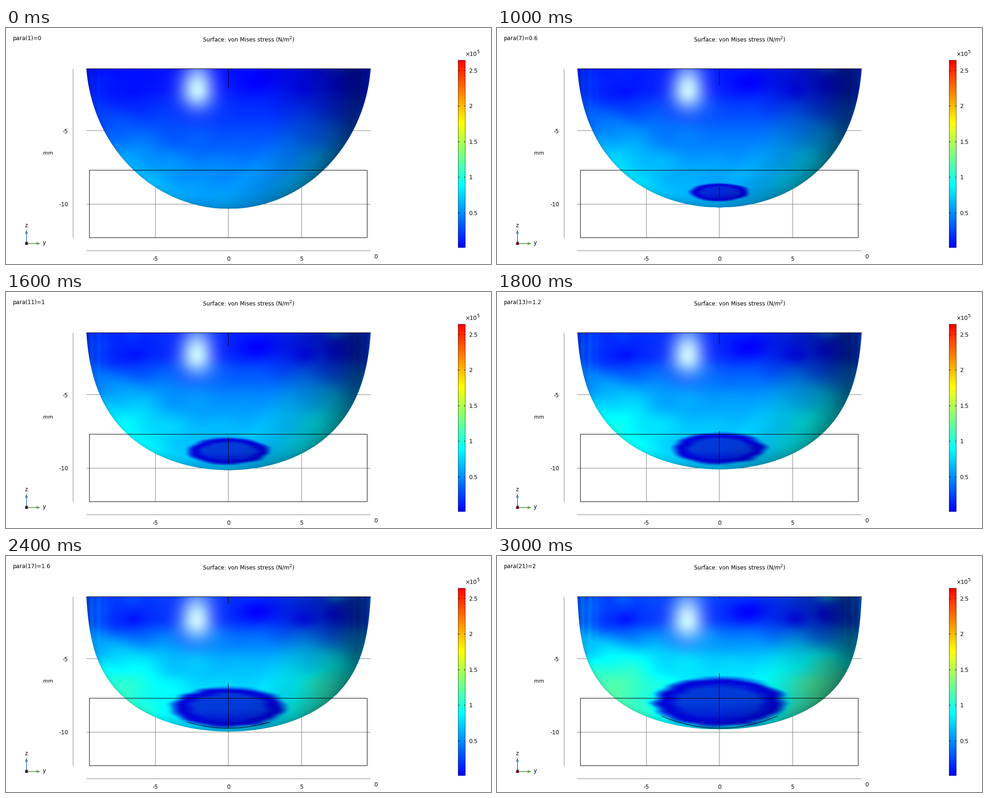
Animation of 1044x507 px, one loop 3200 ms. Source, as a matplotlib script:

```python
import numpy as np
import matplotlib.pyplot as plt
from matplotlib.animation import FuncAnimation
from matplotlib.patches import Circle, Polygon, Rectangle

W, H, DPI = 1044, 507, 64
PX = 72 / DPI
FRAMES, STEPS = 16, 20
CX, TOP, HALF = 479, 87.5, 306
X0, X1, Y0, Y1 = 165, 793, 87, 395

plt.rcParams["font.family"] = "DejaVu Sans"
fig = plt.figure(figsize=(W / DPI, H / DPI), dpi=DPI, facecolor="white")
ax = fig.add_axes([0, 0, 1, 1])
ax.axis("off")


def line(xs, ys, color="black", z=4, width=1):
    return ax.plot(xs, ys, color=color, lw=width * PX, zorder=z, snap=False,
                   solid_capstyle="butt", solid_joinstyle="miter")[0]


def label(x, y, text, size=12, ha="left"):
    return ax.text(x, y, text, fontsize=size * PX, ha=ha, va="baseline", zorder=6)


def rainbow(g):
    """Blue at 0, cyan at 1, yellow at 2, red at 3."""
    knots = [0, 1, 2, 3]
    return np.stack([np.interp(g, knots, [0, 0, 1, 1]),
                     np.interp(g, knots, [0, 1, 1, 0]),
                     np.interp(g, knots, [1, 1, 0, 0])], axis=-1)


def smooth(a, b, v):
    t = np.clip((v - a) / (b - a), 0, 1)
    return t * t * (3 - 2 * t)


# Pixel grid of the bowl and its fixed wispy patterns
gx, gy = np.meshgrid(np.arange(X0, X1) + 0.5, np.arange(Y0, Y1) + 0.5)
dx = gx - CX
rng = np.random.default_rng(4)


def waves(kx, ky, count=10):
    return sum(np.sin(gx * rng.uniform(-kx, kx) + gy * rng.uniform(ky / 4, ky)
                      + rng.uniform(0, 6.3)) for _ in range(count)) / count


wisp = waves(0.07, 0.1)
streak = waves(0.08, 0.4)

# Stress blobs near the rim: x, y, x radius, y radius, strength
BLOBS = [(277, 138, 24, 16, -0.15), (540, 118, 45, 24, -0.18),
         (645, 138, 26, 18, -0.13), (703, 126, 22, 20, -0.15),
         (712, 86, 26, 13, 0.36), (272, 92, 24, 16, 0.13),
         (205, 130, 26, 45, 0.08), (330, 120, 24, 34, 0.05)]
blobs = sum(a * np.exp(-((gx - x) / rx) ** 2 - ((gy - y) / ry) ** 2)
            for x, y, rx, ry, a in BLOBS)
rim_side = smooth(0.78, 1, np.abs(dx) / HALF) * (1 - smooth(150, 210, gy))
blobs += rim_side * (0.16 + 0.06 * np.sin(0.4 * dx))

LEVELS = [87, 140, 180, 220, 270, 330, 388]
REST = [0.03, 0.09, 0.19, 0.33, 0.51, 0.69, 0.74]
PRESSED = [0.23, 0.19, 0.56, 0.92, 1.10, 1.11, 0.95]


def half_width(y, p, bottom):
    t = p / 2
    u = np.clip((y - TOP) / (bottom - TOP), 0, 1)
    q = ((0.15 - 0.05 * t) * u + (0.85 - 0.80 * t) * u**2
         + 0.55 * t * u**3 + 0.30 * t * u**4)
    return HALF * np.sqrt(np.clip(1 - q, 0, 1))


def stress(p, t):
    y = gy + 10 * wisp
    levels = (1 - t) * np.array(REST) + t * np.array(PRESSED)
    base = sum(np.interp(y + d, LEVELS, levels) for d in (-12, -6, 0, 6, 12)) / 5
    side = 0.86 + 0.31 * np.exp(-((np.abs(dx) / HALF - 0.74) / 0.32) ** 2)
    g = base * (1 + (side - 1) * smooth(140, 230, gy))
    g += (0.3 + 0.7 * t) * blobs + (0.03 + 0.04 * t) * wisp
    return np.clip(g, 0, 3)


def bowl(p):
    t = (p / 2) ** 1.1
    bottom = 388.5 - 3.6 * p - 2.2 * p * p
    g = stress(p, t)
    shade = 1.0

    if p > 0:
        hi, lo = 366 - 50 * p, 374 - 6 * p
        rx, ry = 22 + 60 * p - 3.5 * p * p, (lo - hi) / 2
        ey = (gy - (hi + lo) / 2) / ry
        r = np.hypot(dx / rx, ey) + 0.09 * streak
        inner = (0.24 * min(1, p / 0.9) * (1 - smooth(0.62, 0.9, r))
                 * (1 - 0.6 * smooth(0, 0.8, ey)))
        fade = min(1, p / 0.45) * (1 - smooth(0.92, 1.24, r))
        g = g + (inner + 0.03 - g) * fade
        shade = 1 - 0.15 * fade

    # Lambert light from the left, seen on both faces
    w = half_width(gy, p, bottom)
    ny = np.clip((gy - 63) / (bottom - 63), 0, 1)
    ring = np.sqrt(1 - ny**2)
    nx = np.clip(dx / np.maximum(w, 1), -1, 1)
    lam = -0.418 * nx * ring + 0.41 * ny + 0.805 * ring * np.sqrt(1 - nx**2)
    light = 0.37 + 0.82 * np.sqrt(lam**2 + 0.02)
    rgb = rainbow(g) * (np.clip(light, 0, 1) * shade)[..., None]

    sx, sy = gx - 412 + p, gy - 133 - 3 * p
    spot = 0.82 * np.exp(-(sx / 35) ** 2 - (sy / np.where(sy < 0, 57, 40)) ** 2)
    spot += 0.08 * np.exp(-(sx**2 + sy**2) / 65**2)
    rgb += (1 - rgb) * spot[..., None] * np.array([0.87, 1.04, 1.0])

    slope = np.gradient(w, axis=0)
    alpha = np.clip((w - np.abs(dx)) / np.sqrt(1 + slope**2) + 0.5, 0, 1)
    alpha *= gy < bottom + 0.5
    return np.dstack([np.clip(rgb, 0, 1), alpha])


# Grid, axes and base block
GRID = "#808080"
for y in (220.5, 378.5):
    line([173, 785], [y, y], GRID, 1)
for x in (321.5, 478.5, 636.5):
    line([x, x], [300, 450], GRID, 1)
line([144.5, 144.5], [88, 451], GRID, 1)
line([173, 785], [478.5, 478.5], GRID, 1)
ax.add_patch(Rectangle((179.5, 305.5), 598, 145, fill=False, ec="black",
                       lw=PX, snap=False, zorder=4))
line([173, 785], [TOP, TOP])

for y, s in ((226, "-5"), (383, "-10")):
    label(133.5, y, s, ha="right")
for x, s in ((321.5, "-5"), (478.5, "0"), (636, "5")):
    label(x, 500, s, ha="center")
label(796, 495, "0", ha="center")
label(80, 272, "mm", 11)

label(424, 29, "Surface: von Mises stress (N/m")
label(609.5, 24, "2", 9)
label(615.3, 29, ")")
para = label(15, 26, "")

# Colour bar
bar = rainbow(np.linspace(3, 0, 403))[:, None, :]
ax.imshow(bar, extent=(973, 989, 472, 69), interpolation="nearest", aspect="auto", zorder=2)
ax.add_patch(Rectangle((973.5, 69.5), 15, 402, fill=False, ec="black",
                       lw=0.6 * PX, snap=False, zorder=3))
for i, s in enumerate(("2.5", "2", "1.5", "1", "0.5")):
    y = np.floor(91.5 + 76.4 * i) + 0.5
    line([973, 976], [y, y])
    line([986, 989], [y, y])
    label(996.5, y + 4.5, s)
label(988, 60, "×10")
label(1013.5, 54, "5", 9)

# Axis triad
BLUE, GREEN = "#4a80c4", "#55a843"
line([44, 44], [463, 440], BLUE, 4, 1.8)
line([44, 68], [463, 463], GREEN, 4, 1.8)
ax.add_patch(Polygon([(44, 433), (41, 442), (47, 442)], color=BLUE, lw=0, zorder=5))
ax.add_patch(Polygon([(74.5, 463), (66, 460), (66, 466)], color=GREEN, lw=0, zorder=5))
ax.add_patch(Circle((44, 463), 3.2, color="#a01030", lw=0, zorder=5))
label(44, 428, "z", ha="center")
label(44, 466, "x", ha="center")
label(79, 465.5, "y")

skin = ax.imshow(bowl(0), extent=(X0, X1, Y1, Y0), interpolation="nearest",
                 aspect="auto", zorder=2)
rim_seam = line([], [])
pole_seam = line([], [])
arc = line([], [])
ax.set_xlim(0, W)
ax.set_ylim(H, 0)


def update(i):
    n = STEPS * i // (FRAMES - 1)
    p = n / 10
    para.set_text(f"para({n + 1})={p:g}")
    skin.set_data(bowl(p))
    rim_seam.set_data([478.5, 478.5], [TOP, 129 - 7 * p - 6 * p * p])

    d = p - 0.8
    seam = [327 - 75 * d + 10 * d * d, min(370, 367 + 7 * d)]
    pole_seam.set_data([478.5, 478.5], seam)
    pole_seam.set_visible(p > 0.55)

    h = 89 + 89 * (p - 1.6)
    xs = np.linspace(-h, h, 60)
    arc.set_data(CX + xs, 370 - xs**2 / 595)
    arc.set_visible(p > 1.35)
    return skin, para, rim_seam, pole_seam, arc


anim = FuncAnimation(fig, update, frames=FRAMES, interval=200, repeat=True,
                     repeat_delay=0, blit=False)
plt.show()
```
